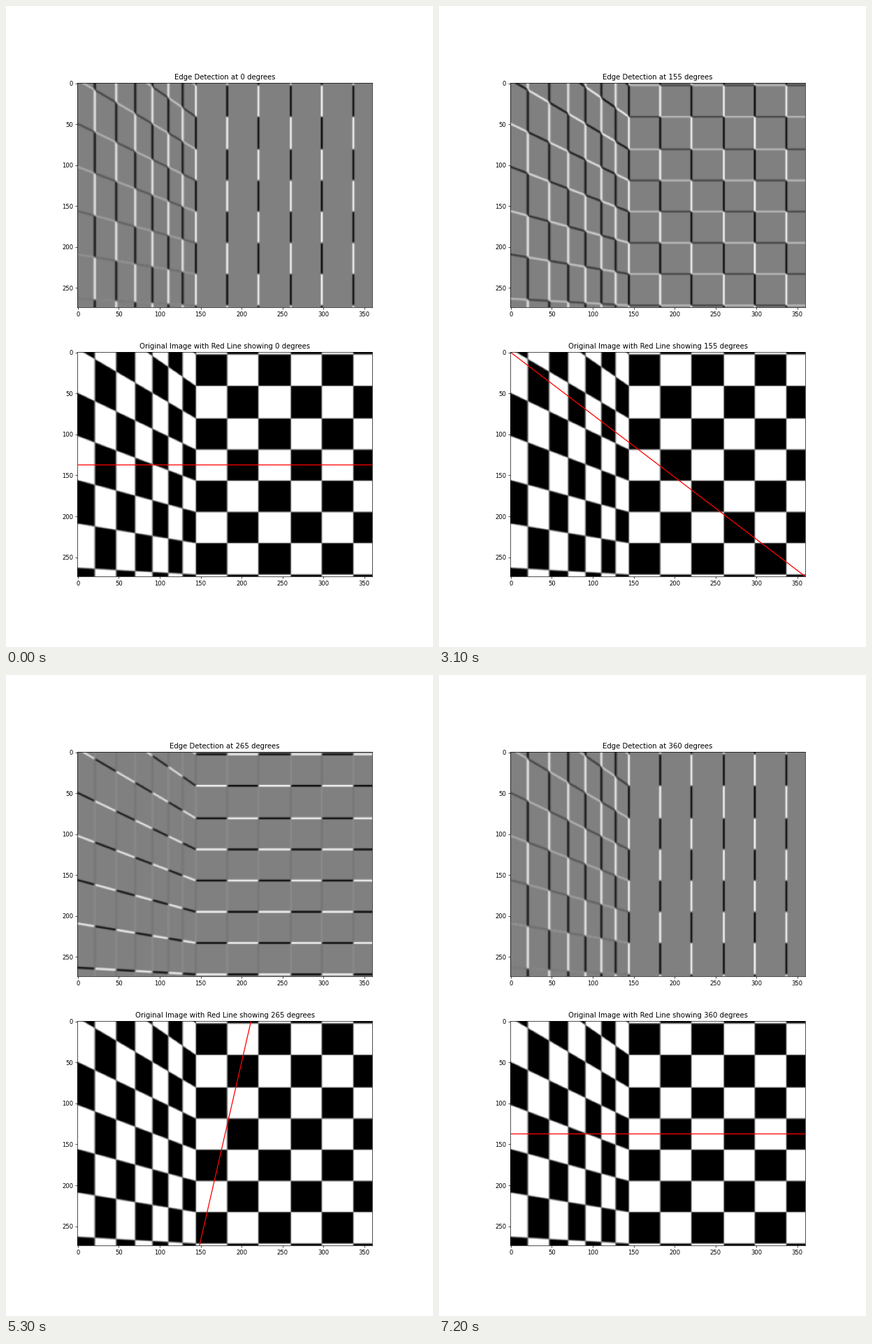
Recreate the animation shown at these times as a matplotlib script. Size 611 px wide and 917 px high, loop 7.3 s.

```python
import numpy as np
import matplotlib.pyplot as plt
from matplotlib.animation import FuncAnimation

DPI = 61.1
W, H = 360, 274
STEP = 5            # degrees per frame
FRAMES = 73
CORNER = 144.3      # column where the two board planes meet

COLUMNS = [20.9, 47, 70.2, 91.2, 110.7, 128.1, CORNER,
           182.5, 220.6, 260.2, 298, 336.5]
ROWS_LEFT = [-112, -58.6, -4.2, 49.5, 102, 156, 209, 263]
ROWS_RIGHT = [2.4, 40.9, 80.6, 118.6, 156.6, 194.8, 232.8, 271.2]


def ramp(distance, half_width):
    return np.clip(distance / half_width, -1, 1)


def checkerboard():
    """Checkerboard on two planes: a slanted one on the left, a flat one on the right."""
    y, x = np.mgrid[0:H, 0:W].astype(float)
    slant = np.clip((CORNER - x) / CORNER, 0, None)
    sign = np.ones((H, W))
    for edge in COLUMNS:
        sign *= ramp(x - edge, 1.4 if edge < CORNER else 1.05)
    softness = np.where(x < CORNER, 1.25, 1.0)
    for left, right in zip(ROWS_LEFT, ROWS_RIGHT):
        sign *= ramp(y - right - (left - right) * slant, softness)
    return 0.5 - 0.5 * sign


def sobel(img):
    p = np.pad(img, 1, mode="edge")
    dx = p[:, 2:] - p[:, :-2]
    dy = p[2:] - p[:-2]
    gx = (dx[:-2] + 2 * dx[1:-1] + dx[2:]) / 4
    gy = (dy[:, :-2] + 2 * dy[:, 1:-1] + dy[:, 2:]) / 4
    return gx, gy


def edges_at(angle):
    t = np.radians(angle)
    response = -(np.cos(t) * grad_x + np.sin(t) * grad_y)
    return response / np.abs(response).max()


def line_at(angle):
    """Line through the centre, each end clamped to the image."""
    t = np.radians(angle)
    reach = np.array([-W, W])
    xs = np.clip(W // 2 + reach * np.cos(t), 0, W - 1)
    ys = np.clip(H // 2 - reach * np.sin(t), 0, H - 1)
    return xs, ys


board = checkerboard()
grad_x, grad_y = sobel(board)

fig, (top, bottom) = plt.subplots(
    2, 1, figsize=((611 + 1e-6) / DPI, (917 + 1e-6) / DPI), dpi=DPI)
edge_view = top.imshow(edges_at(0), cmap="gray", vmin=-1, vmax=1)
bottom.imshow(board, cmap="gray", vmin=0, vmax=1)
line, = bottom.plot(*line_at(0), color="red")
for ax in (top, bottom):
    ax.set_xlim(-0.5, W - 0.5)
    ax.set_ylim(H - 0.5, -0.5)


def update(frame):
    angle = frame * STEP
    edge_view.set_data(edges_at(angle))
    line.set_data(*line_at(angle))
    top.set_title(f"Edge Detection at {angle} degrees")
    bottom.set_title(f"Original Image with Red Line showing {angle} degrees")
    return edge_view, line


anim = FuncAnimation(fig, update, frames=FRAMES, interval=100,
                     repeat=True, repeat_delay=0, blit=False)
plt.show()
```
